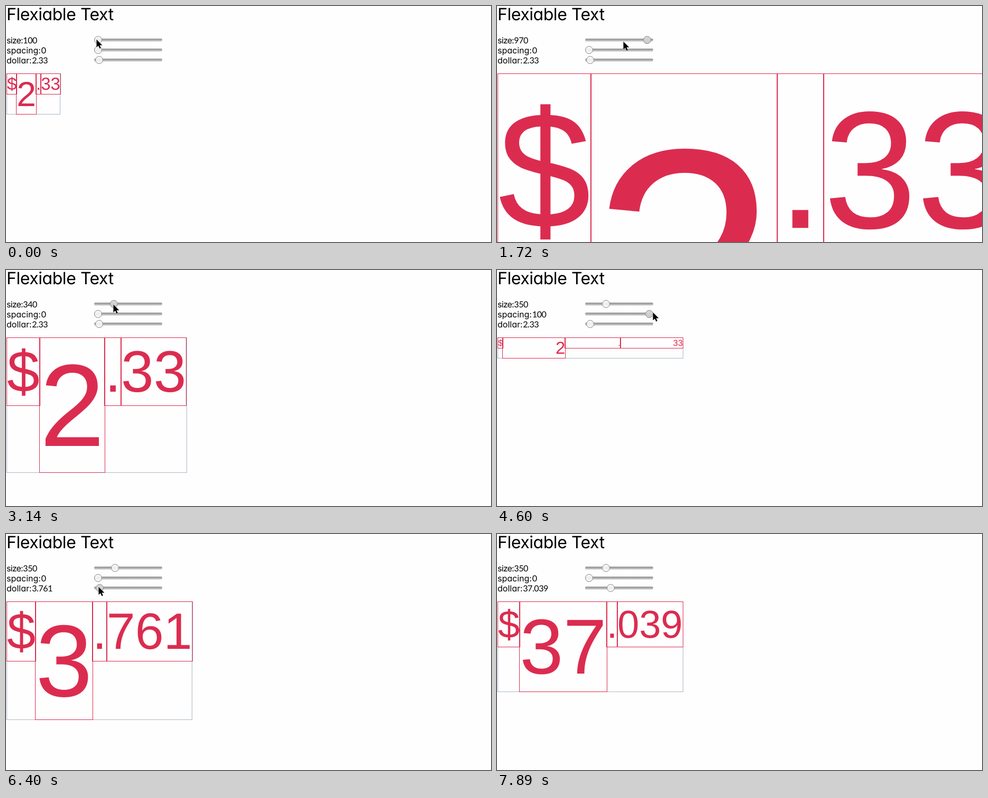
These frames come from a looping animation (919 px wide and 448 px high, 8.47 s). An HTML page:

```html
<!DOCTYPE html>
<html lang="en">
<head>
<meta charset="utf-8">
<title>Flexiable Text</title>
<style>
  html, body { margin: 0; width: 100%; height: 100%; overflow: hidden; background: #fefefe; }
  svg { display: block; width: 919px; height: 448px; text-rendering: geometricPrecision; }
  .word { font-family: Inter, Lato, sans-serif; font-feature-settings: "cv11"; }
  .value { font-family: Lato, sans-serif; font-size: 16px; letter-spacing: -.4px; }
  .price { font-family: "Liberation Sans", Arial, sans-serif; fill: #db2c50; }
  .frame { fill: none; stroke: #db2c50; }
  .outer { fill: none; stroke: #a9b9c6; }
</style>
</head>
<body>
<svg id="stage" viewBox="0 0 919 448">
  <defs>
    <linearGradient id="track" x2="0" y2="1">
      <stop offset="0" stop-color="#777"/>
      <stop offset=".45" stop-color="#b4b4b4"/>
      <stop offset=".75" stop-color="#c4c4c4"/>
      <stop offset="1" stop-color="#999"/>
    </linearGradient>
    <linearGradient id="knob" x2="0" y2="1">
      <stop offset="0" stop-color="#fbfbfb"/>
      <stop offset=".5" stop-color="#ededed"/>
      <stop offset="1" stop-color="#fafafa"/>
    </linearGradient>
    <linearGradient id="pressed" x2="0" y2="1">
      <stop offset="0" stop-color="#d8d8d8"/>
      <stop offset="1" stop-color="#cacaca"/>
    </linearGradient>
  </defs>
  <text class="word" x="1" y="27" font-size="32" letter-spacing="-.45">Flexiable Text</text>
</svg>
<script>
const LOOP = 8470, STEP = 60, STEP_OFFSET = 20;
const TOP = 128, LINE = 1.15, BASELINE = 0.922;
const stage = document.getElementById("stage");

function add(tag, attrs, text = "") {
  const node = document.createElementNS("http://www.w3.org/2000/svg", tag);
  set(node, attrs);
  node.textContent = text;
  return stage.appendChild(node);
}

function set(node, attrs) {
  for (const name in attrs) node.setAttribute(name, attrs[name]);
}

// Linear interpolation through rows of [time, ...values].
function tween(keys, t) {
  const next = keys.findIndex(key => key[0] > t);
  if (next === 0) return keys[0].slice(1);
  if (next < 0) return keys[keys.length - 1].slice(1);
  const a = keys[next - 1], b = keys[next];
  const p = (t - a[0]) / (b[0] - a[0]);
  return a.slice(1).map((v, i) => v + (b[i + 1] - v) * p);
}

const sliders = [
  { name: "size", y: 64.5, valueX: 32.3, spacing: -.8, min: 100, max: 1000, press: [360, 3380],
    format: v => Math.round(v / 10) * 10,
    keys: [[520, 100], [1160, 1000], [1400, 1000], [1700, 970], [1880, 660], [2000, 660],
           [2660, 250], [2840, 250], [3140, 340], [3200, 350]] },
  { name: "spacing", y: 83.5, valueX: 66.8, spacing: 0, min: 0, max: 100, press: [3980, 5600],
    format: Math.round,
    keys: [[4130, 0], [4520, 100], [4760, 100], [5420, 0]] },
  { name: "dollar", y: 102.5, valueX: 49.2, spacing: 0, min: 1, max: 100, press: [6080, 7650],
    format: v => +v.toFixed(3),
    keys: [[6320, 2.33], [6680, 10.917], [6980, 18.803], [7610, 37.039]] }
];

const pointerKeys = [
  [520, 171, 63], [1160, 292, 68], [1340, 292, 68], [1700, 239, 67], [2000, 239, 67],
  [2660, 192, 66], [2840, 192, 66], [3140, 203, 65], [3380, 204, 65], [3900, 171, 80],
  [4130, 171, 80], [4520, 295, 80], [4760, 295, 80], [5480, 152, 80], [5660, 152, 80],
  [5880, 172, 97], [6080, 173, 100], [6320, 173, 100], [6980, 191, 100], [7640, 211, 100],
  [7820, 843, 432], [7880, 930, 480]
];

for (const s of sliders) {
  add("text", { class: "word", x: 1, y: s.y + 6.5, "font-size": 16, "letter-spacing": s.spacing }, s.name + ":");
  s.text = add("text", { class: "value", x: s.valueX, y: s.y + 6.5 });
  add("rect", { x: 167, y: s.y - 2.5, width: 129, height: 5, rx: 2, fill: "url(#track)" });
  s.knob = add("circle", { cy: s.y, r: 7, stroke: "#858585" });
}

const outer = add("rect", { class: "outer" });
const parts = [1, 2, 1, 1].map(scale => ({
  scale,
  frame: add("rect", { class: "frame" }),
  text: add("text", { class: "price" })
}));
const pointer = add("path", {
  d: "M0 0V15L3.5 11.8L6 17.3L8.4 16.2L6 10.9H11Z",
  stroke: "#fff", "stroke-width": 1, "paint-order": "stroke"
});

function placeRect(node, left, right, height) {
  const x = Math.round(left), bottom = Math.round(TOP + height);
  set(node, { x: x + .5, y: TOP + .5, width: Math.round(right) - x - 1, height: bottom - TOP - 1 });
}

const emWidth = str => [...str].reduce((sum, c) => sum + (c === "." ? .278 : .556), 0);

function layoutPrice(size, spacing, dollar) {
  const [whole, cents = ""] = String(dollar).split(".");
  const strings = ["$", whole, ".", cents];
  const ems = strings.reduce((sum, str, i) => sum + emWidth(str) * parts[i].scale, 0);
  const exact = (size - spacing * 3) / ems;
  const base = spacing ? exact : Math.round(exact);
  let x = 1;
  parts.forEach((part, i) => {
    const fontSize = base * part.scale;
    const pad = i ? spacing : 0;
    const width = pad + emWidth(strings[i]) * fontSize;
    placeRect(part.frame, x, x + width + 2, fontSize * LINE + 2);
    set(part.text, { x: x + 1 + pad, y: TOP + 1 + fontSize * BASELINE, "font-size": fontSize });
    part.text.textContent = strings[i];
    x += width;
  });
  placeRect(outer, 1, size + 3, base * 2 * LINE + 2);
}

function draw(time) {
  const t = Math.max(0, Math.floor((time - STEP_OFFSET) / STEP) * STEP + STEP_OFFSET);
  const values = sliders.map(s => {
    const value = s.format(tween(s.keys, t)[0]);
    const down = time >= s.press[0] && time < s.press[1];
    s.text.textContent = value;
    set(s.knob, {
      cx: Math.round(174 + 114 * (value - s.min) / (s.max - s.min)) + .5,
      fill: down ? "url(#pressed)" : "url(#knob)"
    });
    return value;
  });
  layoutPrice(...values);
  const [px, py] = tween(pointerKeys, t).map(Math.round);
  set(pointer, { transform: `translate(${px + .5} ${py + .5})` });
}

function tick() {
  draw(performance.now() % LOOP);
  requestAnimationFrame(tick);
}
tick();
</script>
</body>
</html>
```
